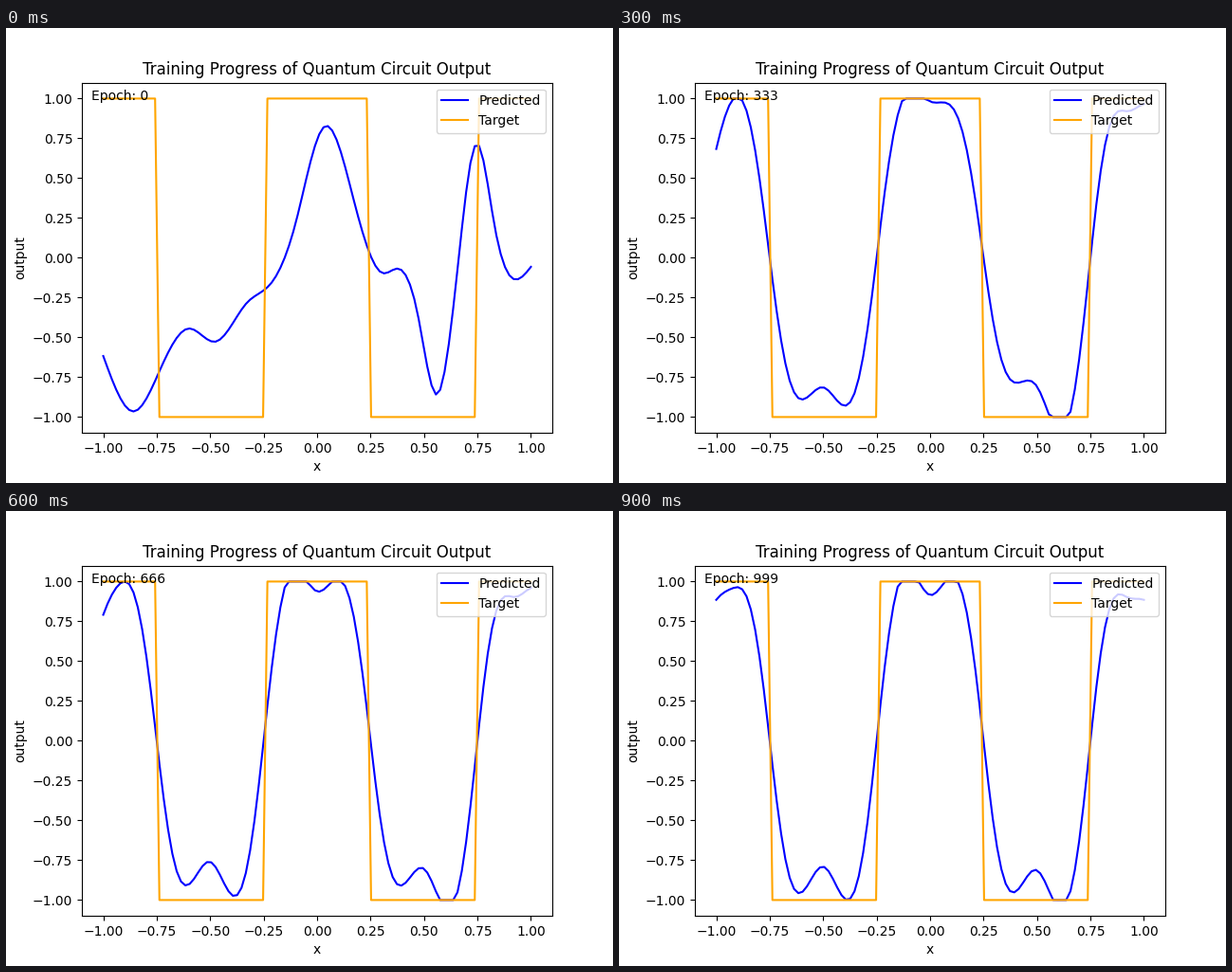
These frames come from a looping animation (640 by 480 pixels, 1000 ms). A matplotlib script:

```python
import matplotlib.pyplot as plt
import numpy as np
from matplotlib.animation import FuncAnimation

FRAMES = 10
EPOCH_STEP = 111

x = np.linspace(-1, 1, 100)
wave = np.cos(2 * np.pi * x)
target = np.sign(wave)

# Turning points and shoulders of the untrained output
START = [(-1, -.617), (-.86, -.965), (-.73, -.69), (-.6, -.444),
         (-.475, -.527), (-.33, -.285), (-.22, -.168), (-.1, .22),
         (.035, .825), (.17, .37), (.305, -.096), (.38, -.068), (.47, -.35),
         (.56, -.86), (.66, -.03), (.745, .715), (.83, .2), (.91, -.126),
         (1, -.057)]

# Training reshapes a cosine: its envelope is low at the middle of each
# plateau and high at each edge, which squares the wave off.
ENVELOPE_X = [-1, -.92, -.75, -.5, -.25, 0, .25, .5, .75, .92, 1]
POSE_STEPS = [1, 2, 5, 9]
POSES = np.array([
    [.68, 1.14, 1.48, .96, 1.22, 1, 1.17, .9, 1.95, 1.1, .857],
    [.645, 1.14, 1.66, .845, 1.68, 1, 1.4, .812, 2.03, 1.06, .955],
    [.76, 1.14, 1.83, .75, 1.98, .945, 1.82, .8, 2.03, 1.03, .985],
    [.885, 1.095, 1.9, .79, 2.03, .915, 1.93, .813, 2.03, 1.03, .885],
])


def spline(knots, values):
    """Natural cubic spline through the knots, sampled on x."""
    knots = np.asarray(knots)
    n = len(knots)
    line = np.column_stack([np.ones(n), knots])
    system = np.block([[np.abs(knots[:, None] - knots) ** 3, line],
                       [line.T, np.zeros((2, 2))]])
    weights = np.linalg.solve(system, np.append(values, [0, 0]))
    cubic = np.abs(x[:, None] - knots) ** 3
    return cubic @ weights[:n] + weights[n] + weights[n + 1] * x


def predicted(step):
    if step == 0:
        return spline(*zip(*START))
    pose = [np.interp(step, POSE_STEPS, track) for track in POSES.T]
    return np.clip(wave * spline(ENVELOPE_X, pose), -1, 1)


fig, ax = plt.subplots(figsize=(6.4, 4.8), dpi=100)
curve, = ax.plot(x, predicted(0), color="blue", label="Predicted")
ax.plot(x, target, color="orange", label="Target")
ax.set(xlim=(-1.1, 1.1), ylim=(-1.1, 1.1), xlabel="x", ylabel="output",
       title="Training Progress of Quantum Circuit Output")
ax.legend(loc="upper right")
epoch_text = ax.text(0.02, 0.95, "", transform=ax.transAxes)


def update(step):
    curve.set_ydata(predicted(step))
    epoch_text.set_text(f"Epoch: {step * EPOCH_STEP}")
    return curve, epoch_text


anim = FuncAnimation(fig, update, frames=FRAMES, interval=100, repeat=True)
plt.show()
```
